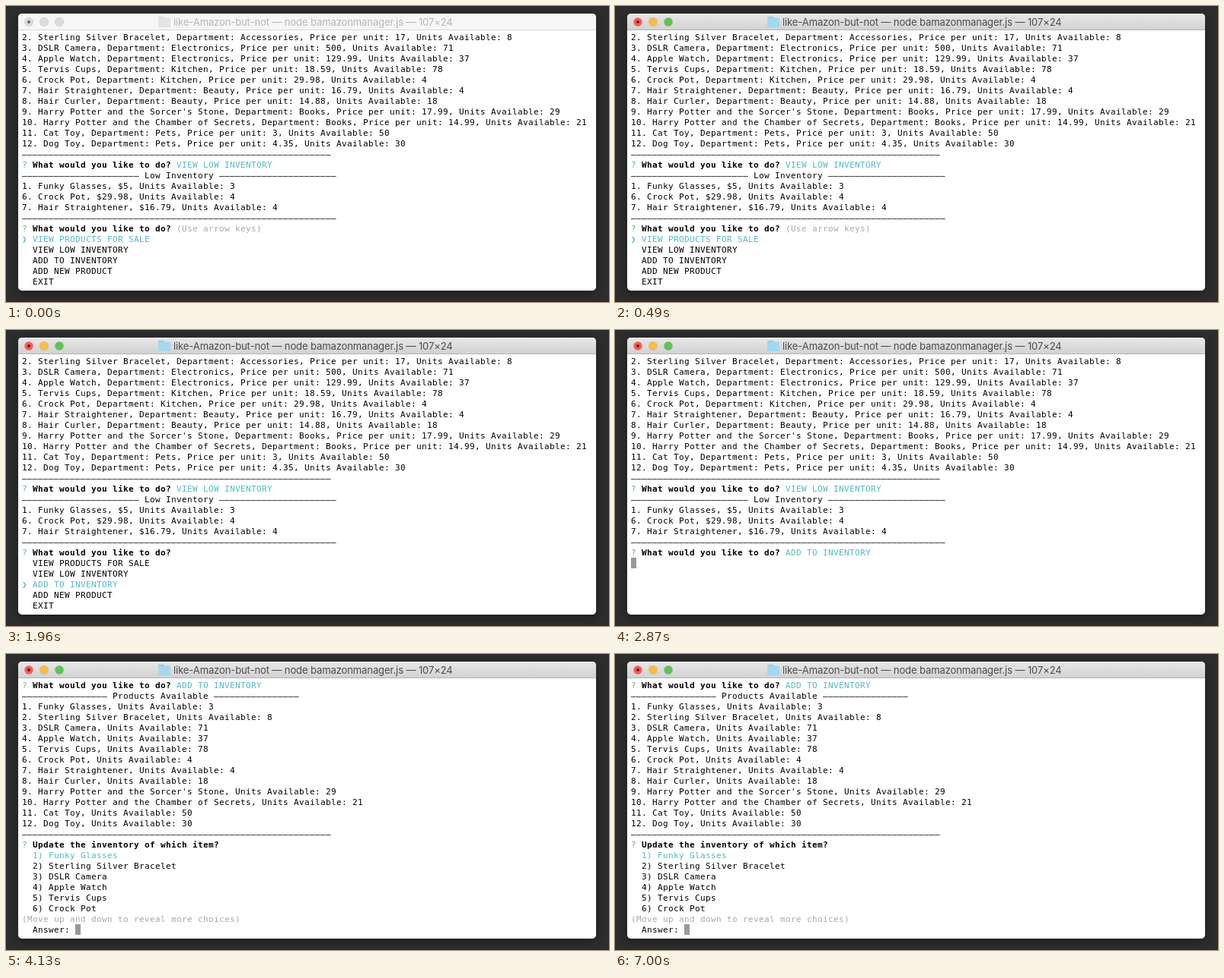
Recreate the animation shown at these times as an HTML page with a canvas. Size 792 by 390 pixels, loop 7140 ms.

```html
<!DOCTYPE html>
<html lang="en">
<head>
<meta charset="utf-8">
<title>Inventory manager</title>
<style>
  html, body { margin: 0; width: 100%; height: 100%; overflow: hidden; background: #2d2d2d; }
  canvas { display: block; }
</style>
</head>
<body>
<canvas id="stage" width="792" height="390"></canvas>
<script>
const ctx = document.getElementById('stage').getContext('2d');
const LOOP = 7140;
const FOCUS = 490, LOW = 1400, ADD = 1960, ENTER = 2800, LIST = 2940;
const CELL = 7, ROW = 14, LEFT = 21, TOP = 34;
const BLACK = '#000', CYAN = '#52b9c5', GREEN = '#62b862', GRAY = '#a9a9a9';
const MONO = '11px "DejaVu Sans Mono", monospace';

const products = [
  ['Funky Glasses', 'Accessories', 5, 3],
  ['Sterling Silver Bracelet', 'Accessories', 17, 8],
  ['DSLR Camera', 'Electronics', 500, 71],
  ['Apple Watch', 'Electronics', 129.99, 37],
  ['Tervis Cups', 'Kitchen', 18.59, 78],
  ['Crock Pot', 'Kitchen', 29.98, 4],
  ['Hair Straightener', 'Beauty', 16.79, 4],
  ['Hair Curler', 'Beauty', 14.88, 18],
  ["Harry Potter and the Sorcer's Stone", 'Books', 17.99, 29],
  ['Harry Potter and the Chamber of Secrets', 'Books', 14.99, 21],
  ['Cat Toy', 'Pets', 3, 50],
  ['Dog Toy', 'Pets', 4.35, 30]
].map(([name, dept, price, units], i) => ({ id: i + 1, name, dept, price, units }));

const actions = ['VIEW PRODUCTS FOR SALE', 'VIEW LOW INVENTORY', 'ADD TO INVENTORY', 'ADD NEW PRODUCT', 'EXIT'];
const QUESTION = 'What would you like to do?';
const rule = n => '–'.repeat(n);
const heading = (text, n) => `${rule(n)} ${text} ${rule(n)}`;

function write(row, col, text, color = BLACK, bold = false) {
  ctx.font = (bold ? 'bold ' : '') + MONO;
  ctx.fillStyle = color;
  [...text].forEach((ch, i) => {
    if (ch !== ' ') ctx.fillText(ch, LEFT + (col + i) * CELL, TOP + row * ROW + 11);
  });
}

function ask(row, question, answer = '', color = CYAN) {
  write(row, 0, '?', GREEN);
  write(row, 2, question, BLACK, true);
  write(row, question.length + 3, answer, color);
}

function cursor(row, col) {
  ctx.fillStyle = '#999';
  ctx.fillRect(LEFT + col * CELL, TOP + row * ROW, CELL, ROW);
}

function box(x, y, w, h, r, fill) {
  ctx.fillStyle = fill;
  ctx.beginPath();
  ctx.roundRect(x, y, w, h, r);
  ctx.fill();
}

function disc(x, y, r, fill) {
  ctx.fillStyle = fill;
  ctx.beginPath();
  ctx.arc(x, y, r, 0, Math.PI * 2);
  ctx.fill();
}

function drawWindow(active) {
  ctx.fillStyle = '#2d2d2d';
  ctx.fillRect(0, 0, 792, 390);
  ctx.shadowColor = 'rgba(0,0,0,.35)';
  ctx.shadowBlur = 14;
  ctx.shadowOffsetY = 4;
  box(16, 10, 759, 365, 5, '#fff');
  ctx.shadowColor = 'transparent';

  const bar = ctx.createLinearGradient(0, 10, 0, 31);
  bar.addColorStop(0, active ? '#e8e8e8' : '#f6f6f6');
  bar.addColorStop(1, active ? '#d2d2d2' : '#f6f6f6');
  box(16, 10, 759, 21, [5, 5, 0, 0], bar);
  ctx.fillStyle = active ? '#b4b4b4' : '#d6d6d6';
  ctx.fillRect(16, 31, 759, 1);

  ['#fc5b55', '#f9bd40', '#5fc454'].forEach((color, i) => {
    const x = 30 + i * 20;
    disc(x, 21, 6, active ? 'rgba(0,0,0,.14)' : '#cbcbcb');
    disc(x, 21, 5.5, active ? color : '#dcdcdc');
  });
  disc(30, 21, 2, active ? '#79100c' : '#666');

  box(200, 14, 8, 5, 1, active ? '#8fc8e2' : '#dedede');
  box(200, 15.5, 16, 12.5, 1, active ? '#a5d7ee' : '#e4e4e4');

  ctx.font = '13px Inter, "Liberation Sans", sans-serif';
  ctx.letterSpacing = '-0.1px';
  ctx.fillStyle = active ? '#4b4b4b' : '#b6b6b6';
  ctx.fillText('like-Amazon-but-not — node bamazonmanager.js — 107×24', 220, 26);
  ctx.letterSpacing = '0px';
}

function drawMenu(t) {
  products.slice(1).forEach((p, i) => write(i, 0,
    `${p.id}. ${p.name}, Department: ${p.dept}, Price per unit: ${p.price}, Units Available: ${p.units}`));
  write(11, 0, rule(58));
  ask(12, QUESTION, actions[1]);
  write(13, 0, heading('Low Inventory', 22));
  products.filter(p => p.units < 5).forEach((p, i) =>
    write(14 + i, 0, `${p.id}. ${p.name}, $${p.price}, Units Available: ${p.units}`));
  write(17, 0, rule(59));

  if (t >= ENTER) {
    ask(18, QUESTION, actions[2]);
    cursor(19, 0);
    return;
  }
  ask(18, QUESTION, t < LOW ? '(Use arrow keys)' : '', GRAY);
  const selected = t < LOW ? 0 : t < ADD ? 1 : 2;
  actions.forEach((action, i) => {
    const on = i === selected;
    write(19 + i, 0, (on ? '❯ ' : '  ') + action, on ? CYAN : BLACK);
  });
}

function drawList() {
  ask(0, QUESTION, actions[2]);
  write(1, 0, heading('Products Available', 16));
  products.forEach((p, i) => write(2 + i, 0, `${p.id}. ${p.name}, Units Available: ${p.units}`));
  write(14, 0, rule(58));
  ask(15, 'Update the inventory of which item?');
  products.slice(0, 6).forEach((p, i) => write(16 + i, 2, `${p.id}) ${p.name}`, i ? BLACK : CYAN));
  write(22, 0, '(Move up and down to reveal more choices)', GRAY);
  write(23, 2, 'Answer:');
  cursor(23, 10);
}

const start = performance.now();
function frame(now) {
  const t = Math.max(0, now - start) % LOOP;
  drawWindow(t >= FOCUS);
  if (t < LIST) drawMenu(t);
  else drawList();
  requestAnimationFrame(frame);
}
frame(start);
</script>
</body>
</html>
```
